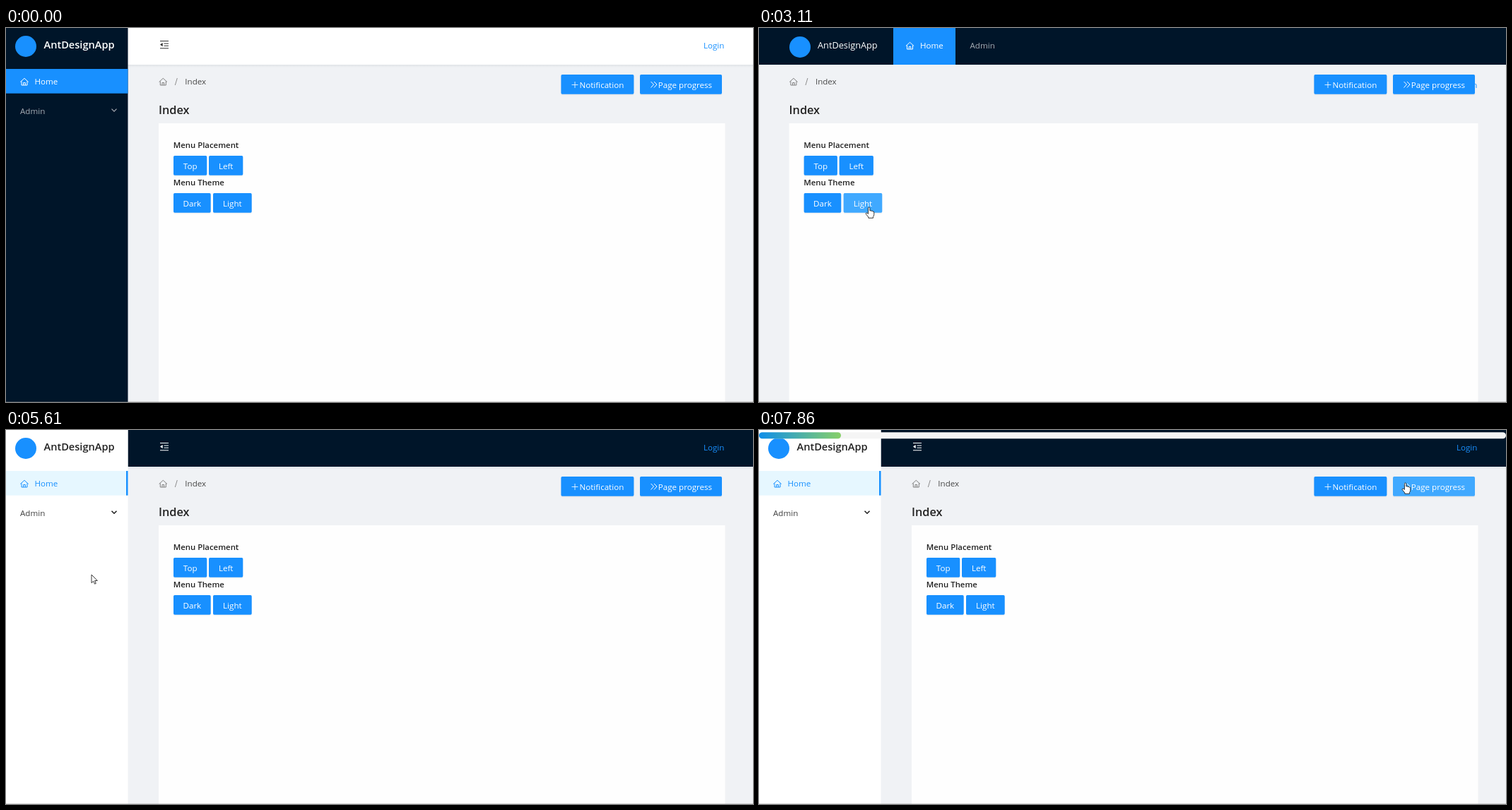
An HTML page for the animation above (7.99 s loop, 1057 px wide and 530 px high).

```html
<!DOCTYPE html>
<html lang="en">
<head>
<meta charset="utf-8">
<title>Layout settings</title>
<style>
html, body { margin: 0; width: 100%; height: 100%; overflow: hidden; background: #f0f2f5; }
svg { display: block; width: 100vw; height: 100vh; font-family: "Open Sans", "Noto Sans", sans-serif; }
</style>
</head>
<body>
<svg id="stage" viewBox="0 0 1057 530" preserveAspectRatio="none"></svg>
<script>
const LOOP = 7990, TICK = 125;
const TO_TOP = 1750, TO_LIGHT = 3610, TO_LEFT = 5610, BAR = 7345;
const BLUE = '#1890ff', HOVER = '#40a9ff', NAVY = '#001529', INK = '#222';
const BTN_H = 27.7;

// Pointer moves: start, end, target x, target y
const moves = [
  [100, 970, 275, 201], [2360, 3110, 156, 254], [4600, 4840, 127, 222],
  [4840, 5360, 121, 205], [6095, 6470, 722, 119], [6470, 6860, 915, 75]
];

const clamp = v => Math.max(0, Math.min(1, v));
const ramp = (t, a, b) => clamp((t - a) / (b - a));
const easeInOut = p => p < .5 ? 4 * p ** 3 : 1 - 4 * (1 - p) ** 3;
const easeOut = p => Math.sin(p * Math.PI / 2);
const rgb = c => [1, 3, 5].map(i => parseInt(c.slice(i, i + 2), 16));
const mix = (a, b, p) => {
  const to = rgb(b);
  return `rgb(${rgb(a).map((v, i) => Math.round(v + (to[i] - v) * p))})`;
};

// The picture moves on a fixed beat
const snap = t => Math.max(0, 95 + TICK * Math.floor((t - 95) / TICK));

const rect = (x, y, w, h, fill, more = '') =>
  `<rect x="${x}" y="${y}" width="${w}" height="${h}" fill="${fill}" ${more}/>`;
const line = (d, color, w = 1) =>
  `<path d="${d}" fill="none" stroke="${color}" stroke-width="${w}"/>`;
const text = (x, y, s, fill, size = 11.6, more = '') =>
  `<text x="${x}" y="${y}" font-size="${size}" fill="${fill}" ${more}>${s}</text>`;
const bold = (x, y, s, fill, size) => text(x, y, s, fill, size, 'font-weight="600"');
const group = (x, y, s) => `<g transform="translate(${x} ${y})">${s}</g>`;
const logo = (x, y) => `<circle cx="${x}" cy="${y}" r="15" fill="${BLUE}"/>`;
const house = (x, y, c) =>
  group(x, y, line('M.3 6 6 .8 11.7 6M2 5V10.5H10V5M4.7 10.5V7H7.3V10.5', c));

function pointerAt(t) {
  let x = 943, y = 460;
  for (const [a, b, toX, toY] of moves) {
    const p = easeOut(ramp(t, a, b));
    x += (toX - x) * p;
    y += (toY - y) * p;
  }
  return [x, y];
}

const buttonList = x => [
  { x: x + 21, y: 181, w: 47.3, label: 'Top' },
  { x: x + 71, y: 181, w: 48.3, label: 'Left' },
  { x: x + 21, y: 234, w: 52.7, label: 'Dark' },
  { x: x + 77, y: 234, w: 54.7, label: 'Light' },
  { x: 785.4, y: 66, w: 103, label: 'Notification', shift: 6 },
  { x: 897, y: 66, w: 116, label: 'Page progress', shift: 6 }
];

function over(b, t) {
  const [x, y] = pointerAt(t);
  return x >= b.x && x <= b.x + b.w && y >= b.y && y <= b.y + BTN_H;
}

// Hover colour follows the pointer one beat late and takes two beats
function button(b, t) {
  const hover = (over(b, t - TICK) + over(b, t - 2 * TICK)) / 2;
  return rect(b.x, b.y + 1.7, b.w, BTN_H, '#000', 'rx="1.7" opacity=".045"') +
    rect(b.x, b.y, b.w, BTN_H, mix(BLUE, HOVER, hover), 'rx="1.7"') +
    text(b.x + b.w / 2 + (b.shift || 0), b.y + 18.6, b.label, '#fff', 11.6, 'text-anchor="middle"');
}

function clickRing(b, t) {
  const grow = 5 * ramp(t, TO_LIGHT - 50, TO_LIGHT + 250);
  const fade = .08 * (1 - ramp(t, TO_LIGHT, TO_LIGHT + 500));
  return rect(b.x - grow, b.y - grow, b.w + 2 * grow, BTN_H + 2 * grow, BLUE, `rx="4" opacity="${fade}"`);
}

const menuIcon = c =>
  line('M218 18.5H230M223.5 22H230M223.5 25.3H230M218 28.7H230', c, 1.1) +
  `<path d="M218 23.6 221.7 21V26.3Z" fill="${c}"/>`;

function sideLayout(light) {
  const item = light ? BLUE : '#fff', admin = light ? '#404040' : '#a6adb4';
  return rect(172.5, 0, 885, 52, light ? NAVY : '#fff') +
    rect(172.5, 52, 885, 4, 'url(#shade)') +
    rect(0, 0, 172.5, 530, light ? '#fff' : NAVY) +
    logo(28, 26) + bold(53.5, 28.7, 'AntDesignApp', light ? INK : '#fff', 14.6) +
    rect(0, 58, 172.5, 34.7, light ? '#e6f7ff' : BLUE) +
    (light ? rect(170, 58, 2.5, 34.7, BLUE) : '') +
    house(20, 70.5, item) + text(40.5, 80.3, 'Home', item) +
    text(20, 122, 'Admin', admin) +
    line('M149.5 114.7 153 118.2 156.5 114.7', light ? INK : admin, light ? 1.6 : 1.2) +
    menuIcon(light ? '#fff' : '#333') + text(987, 29, 'Login', BLUE);
}

function topLayout(t, light) {
  const p = light ? easeInOut(ramp(t, 3500, 3800)) : 0;
  const q = light ? easeInOut(ramp(t, 3615, 3915)) : 0;
  const item = mix('#ffffff', BLUE, q), y = light ? 1 : 0;
  return rect(0, 0, 1057, 52, light ? '#fff' : NAVY) +
    rect(60, 0, 957, 52 + y, mix(NAVY, '#ffffff', p)) +
    rect(190, 0, 88, 52 + y, BLUE, `opacity="${1 - p}"`) +
    (light ? rect(207, 51.5, 54, 1.5, BLUE) : '') +
    logo(58, 27) + text(83, 29.2, 'AntDesignApp', light ? '#333' : '#fff', 12.75) +
    house(207.5, 19.5 + y, item) + text(228, 29.3 + y, 'Home', item) +
    text(298.5, 29.3 + y, 'Admin', mix('#a6adb4', '#404040', p)) +
    text(987, 85, 'Login', BLUE);
}

const content = x => rect(x, 135, 1017.5 - x, 395, '#fefefe') + group(x, 0,
  house(.3, 70.5, '#808080') + line('M23.3 81 26.3 71', '#8c8c8c') +
  text(37.3, 80.3, 'Index', '#484848') +
  bold(0, 121.5, 'Index', INK, 16.3) +
  bold(20.7, 170, 'Menu Placement', INK, 11.4) +
  bold(20.7, 223, 'Menu Theme', INK, 11.4));

const actionIcons = line('M800.5 80.5H809.5M805 76V85', '#fff', .8) +
  line('M912.5 76 916.5 80 912.5 84.5M917 76 921 80 917 84.5', '#fff');

function progress(t) {
  if (t < BAR) return '';
  const w = 116 * easeOut(ramp(t, BAR - 45, 7845));
  return rect(0, 3.3, 1057, 9, '#f5f5f5', 'rx="4.5"') +
    rect(0, 3.3, w, 9, 'url(#fill)', 'rx="4.5"');
}

function pointer(t, buttons) {
  if (t < 200) return '';
  const hand = buttons.some(b => over(b, t) && over(b, t - TICK));
  const shape = hand
    ? 'M-1.6 9.5V1.2Q-1.5 0 -.4 0T.8 1.2V5Q2.2 4.2 3 5.4 4.4 4.8 5 6 6.6 5.6 6.7 7.2V10.5Q6.5 12.5 5.4 13.5V15.3H-1.2V14L-4.8 9.6Q-5.2 8.2 -4 8Q-2.8 8 -1.6 9.5Z'
    : 'M0 0V11.7L2.7 9.2 4.5 13.2 6.3 12.4 4.6 8.5H8.3Z';
  return group(...pointerAt(t),
    `<path d="${shape}" fill="#fff" stroke="${INK}" stroke-width=".9" stroke-linejoin="round"/>`);
}

const defs = `<defs>
  <linearGradient id="fill"><stop stop-color="#108ee9"/><stop offset="1" stop-color="#87d068"/></linearGradient>
  <linearGradient id="shade" x2="0" y2="1"><stop stop-color="${NAVY}" stop-opacity=".07"/><stop offset="1" stop-color="${NAVY}" stop-opacity="0"/></linearGradient>
</defs>`;

// Layout cuts use the exact time, motion uses the beat
function scene(now) {
  const t = snap(now);
  const top = now >= TO_TOP && now < TO_LEFT, light = now >= TO_LIGHT;
  const x = top ? 42.6 : 216;
  const buttons = buttonList(x);
  return defs + rect(0, 0, 1057, 530, '#f0f2f5') +
    (top ? topLayout(t, light) : sideLayout(light)) +
    content(x) + (top && light ? clickRing(buttons[3], t) : '') +
    buttons.map(b => button(b, t)).join('') + actionIcons +
    rect(0, 529, 1057, 1, '#808080', 'opacity=".3"') +
    progress(t) + pointer(t, buttons);
}

const stage = document.getElementById('stage');
const start = performance.now();
let shown = '';
function frame() {
  const next = scene((performance.now() - start) % LOOP);
  if (next !== shown) stage.innerHTML = shown = next;
  requestAnimationFrame(frame);
}
frame();
</script>
</body>
</html>
```
